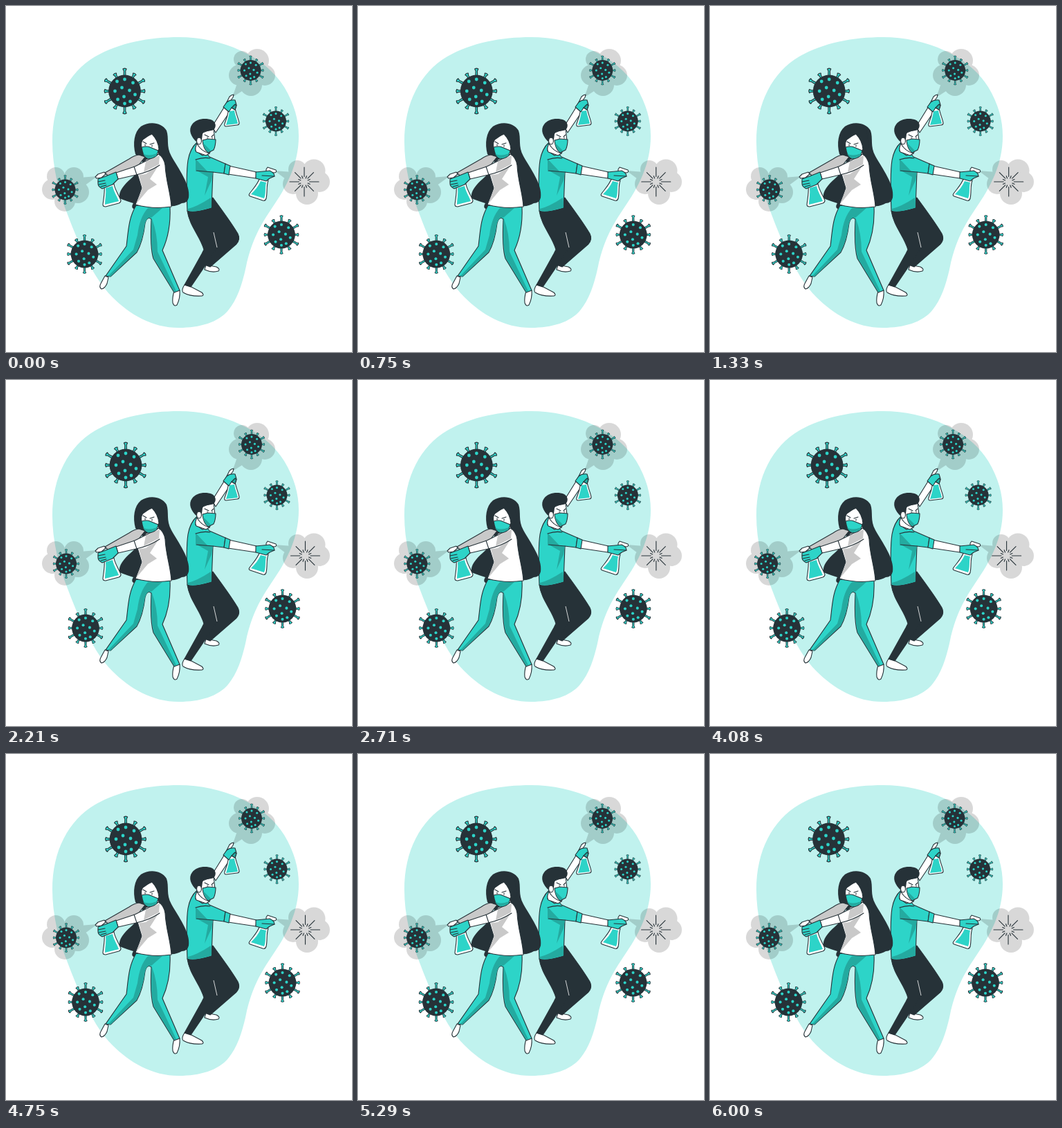
These frames come from a looping animation (500x500 px, 6040 ms). An HTML page:

```html
<!DOCTYPE html>
<html lang="en">
<head>
<meta charset="utf-8">
<title>Spraying viruses</title>
<style>
  html, body { margin: 0; width: 100%; height: 100%; overflow: hidden; background: #fff; }
  svg { display: block; width: 100vw; height: 100vh; }
  .l { stroke: #263238; stroke-width: 1.1; stroke-linejoin: round; stroke-linecap: round; fill: none; }
  .w { fill: #fff; }
  .t { fill: #2dd4c8; }
  .s { fill: #24aaa0; }
  .g { fill: #c9c9c9; }
  .d { fill: #263238; }
  .cloud { opacity: .15; }
</style>
</head>
<body>
<svg viewBox="0 0 500 500">
  <path fill="#c0f2ee" d="M250 45C312 45 374 72 402 117C417 142 423 165 423 188C423 228 406 261 383 294C364 322 354 344 347 376C341 404 334 424 321 440C307 457 280 465 250 465C211 465 179 446 153 420C124 390 105 343 90 304C76 269 67 232 67 196C67 140 90 96 129 73C164 53 207 45 250 45Z"/>

  <g id="clouds"></g>
  <g id="viruses"></g>

  <g id="man">
    <!-- raised arm and bottle -->
    <path class="l w" d="M298 174L316 145L324 152L303 183Z"/>
    <path class="l w" d="M322 148L331 147C332 155 336 163 337 169Q337 172 334 172L318 174Q315 174 316 170C319 163 321 155 322 148Z"/>
    <path class="t" d="M323 152L330 151C331 158 334 164 335 170L318 172C320 165 322 159 323 152Z"/>
    <path class="l w" d="M317 143L323 131Q326 128 329 128L328 132L322 140L319 146Z"/>
    <path class="l t" d="M314 146L319 139Q324 135 331 136L333 143L331 150L326 147L322 153Z"/>
    <path class="l s" d="M326 147L331 142L333 144L331 150Z"/>
    <!-- shoes and trousers -->
    <path class="l w" d="M289 374L304 377Q310 380 307 383Q298 386 287 381Z"/>
    <path class="l w" d="M258 403L266 405L283 414Q287 418 283 419Q266 420 256 414Q253 410 258 403Z"/>
    <path class="l d" d="M262 296L299 277C312 295 325 312 335 329Q339 337 333 344L295 377L287 374L305 350L267 406L258 403L283 358L286 352C281 333 265 318 262 296Z"/>
    <path fill="#c0f2ee" d="M304 323L305 349L317 342Z" opacity=".0"/>
    <path d="M300 327L305 349" stroke="#fff" stroke-width=".8"/>
    <!-- torso -->
    <path class="l t" d="M276 197Q266 206 263 223C260 243 261 270 262 296Q270 300 297 292L299 240L315 242L317 228L294 218Q286 208 276 197Z"/>
    <path class="s" d="M274 221L291 239L299 240L297 252L287 274L292 247L274 237Z"/>
    <path class="s" d="M263 293Q276 290 296 277L297 291Q271 299 263 295Z"/>
    <path class="l" d="M274 222Q285 218 295 220M275 238L299 240"/>
    <!-- extended arm and bottle -->
    <path class="l w" d="M322 231L362 240L361 249L321 243Z"/>
    <path class="l t" d="M317 228L324 231L322 244L315 242Z"/>
    <path class="l w" d="M367 248L379 252C376 260 378 269 376 278Q375 282 371 281L353 275Q350 274 352 271C358 263 364 257 367 248Z"/>
    <path class="t" d="M368 253L376 255C374 263 376 271 373 278L354 272C360 266 365 260 368 253Z"/>
    <path class="l w" d="M376 236L378 233L390 237Q392 240 388 241L381 240L379 245L376 243Z"/>
    <path class="l t" d="M361 240L372 239L381 238Q388 241 388 246L381 249L376 253L361 249Z"/>
    <path class="l" d="M370 245L388 246"/>
    <!-- head -->
    <path class="l w" d="M279 185L276 200L274 209L284 216L294 213L302 195L300 177Z"/>
    <path class="l w" d="M276 199Q272 206 275 211L289 216L294 213Q282 210 276 199Z"/>
    <path class="d" d="M276 197C267 189 263 179 269 171C275 163 288 161 298 165C304 169 304 175 300 179C294 182 286 179 284 185L283 193Z"/>
    <path class="l t" d="M284 194L292 192L303 193Q303 202 300 208L292 212Q285 207 284 194Z"/>
    <path class="s" d="M285 198L296 209L292 211Q286 206 285 198Z"/>
    <ellipse class="l w" cx="279" cy="195" rx="3.4" ry="4.8"/>
    <path class="l" d="M287 186L293 189M297 189L300 186M291 190V191M298 190V191"/>
  </g>

  <g id="woman">
    <path class="d" d="M187 214C183 199 185 182 195 174C207 166 225 168 232 180C236 191 231 203 239 217C249 235 267 258 264 277Q262 285 254 285Q246 290 236 289L187 294Q179 292 184 285Q177 283 164 278C162 268 171 258 180 250L201 230Z"/>
    <!-- far arm -->
    <path class="l g" d="M201 218L192 215Q185 216 178 221L143 241L149 247L190 232Z"/>
    <!-- shoes and trousers -->
    <path class="l w" d="M143 390L148 392L146 401Q143 408 138 409Q134 406 137 401Z"/>
    <path class="l w" d="M243 412L251 411Q252 422 247 432Q243 435 241 429Q240 422 243 412Z"/>
    <path class="l t" d="M188 288L237 290C238 315 234 336 226 353L251 411L243 414L213 365Q208 349 210 308Q204 303 201 314Q198 340 189 356L151 391L144 390L174 347C177 323 177 307 188 288Z"/>
    <path class="s" d="M205 292Q193 305 190 331L184 352L148 390L151 391L189 355Q198 337 201 314Q204 304 210 306L226 292Z"/>
    <path class="s" d="M211 308Q219 329 219 355L246 412L243 413L214 365Q209 346 211 308Z"/>
    <!-- torso and near arm -->
    <path class="l w" d="M202 222L220 214Q228 218 230 230C231 253 238 270 239 290Q212 294 187 287Q192 275 196 263L190 243Z"/>
    <path class="g" d="M222 228L202 243L192 244L197 263L188 286L205 266L218 258L208 250Z"/>
    <path class="l w" d="M207 207V221L221 214L219 207Z"/>
    <path class="w" d="M221 214L186 232L159 241L162 250L188 244L222 230Z"/>
    <path class="l" d="M221 214Q203 224 186 232L159 241L162 250L188 244Q207 240 222 230M185 232L189 244"/>
    <path class="g" d="M202 225L222 216L221 229L199 240Z"/>
    <!-- bottle and glove -->
    <path class="l w" d="M142 261L156 257C157 265 163 273 166 281Q166 284 163 285L144 290Q140 290 140 287C141 278 143 270 142 261Z"/>
    <path class="t" d="M144 263L154 260C156 269 161 276 163 282L143 287C143 279 145 271 144 263Z"/>
    <path class="l w" d="M129 247L133 243L142 240L144 243L138 248L131 249Z"/>
    <path class="l t" d="M133 250L144 246L159 240L162 250L154 258L139 264Q133 261 133 257Z"/>
    <path class="l" d="M133 254L143 252M134 258L144 256M137 261L145 259"/>
    <!-- face -->
    <path class="l w" d="M196 206Q194 195 200 190L211 185Q220 194 221 207L213 218L201 216Z"/>
    <path class="d" d="M190 198Q200 193 211 184Q222 197 222 208L230 205L226 179L204 172L190 184Z"/>
    <path class="l t" d="M196 204Q204 202 208 204L220 209L218 216Q212 221 206 221Q198 219 196 204Z"/>
    <path class="s" d="M198 213Q205 218 218 213L217 217L207 220Q201 220 198 213Z"/>
    <path class="l" d="M198 196L203 199M208 200L214 198M201 200V202M211 201V203"/>
  </g>
</svg>
<script>
  // Each cloud: lobes as x, y, r, then a spray tail polygon.
  const clouds = [
    [[[72, 246, 13], [98, 247, 14], [67, 265, 15], [104, 269, 16], [85, 282, 15], [85, 262, 19]], '106,248 132,246 113,260'],
    [[[341, 77, 12], [363, 79, 17], [374, 100, 15], [354, 114, 16], [337, 100, 15], [354, 94, 19]], '335,109 327,132 349,118'],
    [[[421, 236, 13], [445, 238, 16.5], [453, 254, 15], [435, 271, 16], [415, 257, 15], [433, 252, 19]], '414,240 388,238 408,253']
  ];
  document.getElementById('clouds').innerHTML = clouds.map(([lobes, tail]) =>
    `<g class="cloud">${lobes.map(([x, y, r]) => `<circle cx="${x}" cy="${y}" r="${r}"/>`).join('')}<polygon points="${tail}"/></g>`
  ).join('');

  const dots = [[-11, -14], [0, -17], [12, -12], [-14, 0], [-4, -5], [7, -1], [15, 5], [-10, 12], [-1, 8], [8, 15], [0, 18]];
  const steps = [...Array(12).keys()];

  function virus(x, y, k) {
    const spikes = steps.map(i => {
      const r = i % 6 === 3 || i % 6 === 1 || i % 6 === 5 ? -29.5 : -33;
      return `<path class="l t" d="M-1.4 -22L-1.2 ${r + 4}L-2.6 ${r + 1}Q0 ${r - .8} 2.6 ${r + 1}L1.2 ${r + 4}L1.4 -22Z" transform="rotate(${i * 30})"/>`;
    }).join('');
    const spots = dots.map(([a, b]) => `<circle class="t" cx="${a}" cy="${b}" r="2.4"/>`).join('');
    return `<g transform="translate(${x} ${y}) scale(${k})">${spikes}<circle class="d" r="23.4"/>${spots}</g>`;
  }

  // Radiating dashes left by a destroyed virus.
  const burst = [...Array(16).keys()].map(i => {
    const [from, to] = i % 2 ? [5.5, 9] : i % 4 ? [7, 19] : [7.5, 21];
    return `<path class="l" d="M${from} 0H${to}" transform="translate(431 254) rotate(${i * 22.5})"/>`;
  }).join('');

  const group = document.getElementById('viruses');
  group.innerHTML = [
    [171.5, 123, 1], [353.5, 93, .64], [390, 166.5, .64],
    [85.5, 265.5, .64], [113.5, 358.5, .85], [398, 330.5, .85]
  ].map(v => virus(...v)).join('') + burst;

  // Horizontal shake, one key every 600 ms, with a short rest before looping.
  const keys = [0, -1, 2, -4, 4, -4, 4, -4, 2, -1, 0];

  function draw(now) {
    const p = Math.min(now % 6040, 5999.9) / 600, i = Math.floor(p);
    const x = keys[i] + (keys[i + 1] - keys[i]) * (p - i);
    group.setAttribute('transform', `translate(${x.toFixed(3)} 0)`);
    requestAnimationFrame(draw);
  }
  draw(performance.now());
</script>
</body>
</html>
```
